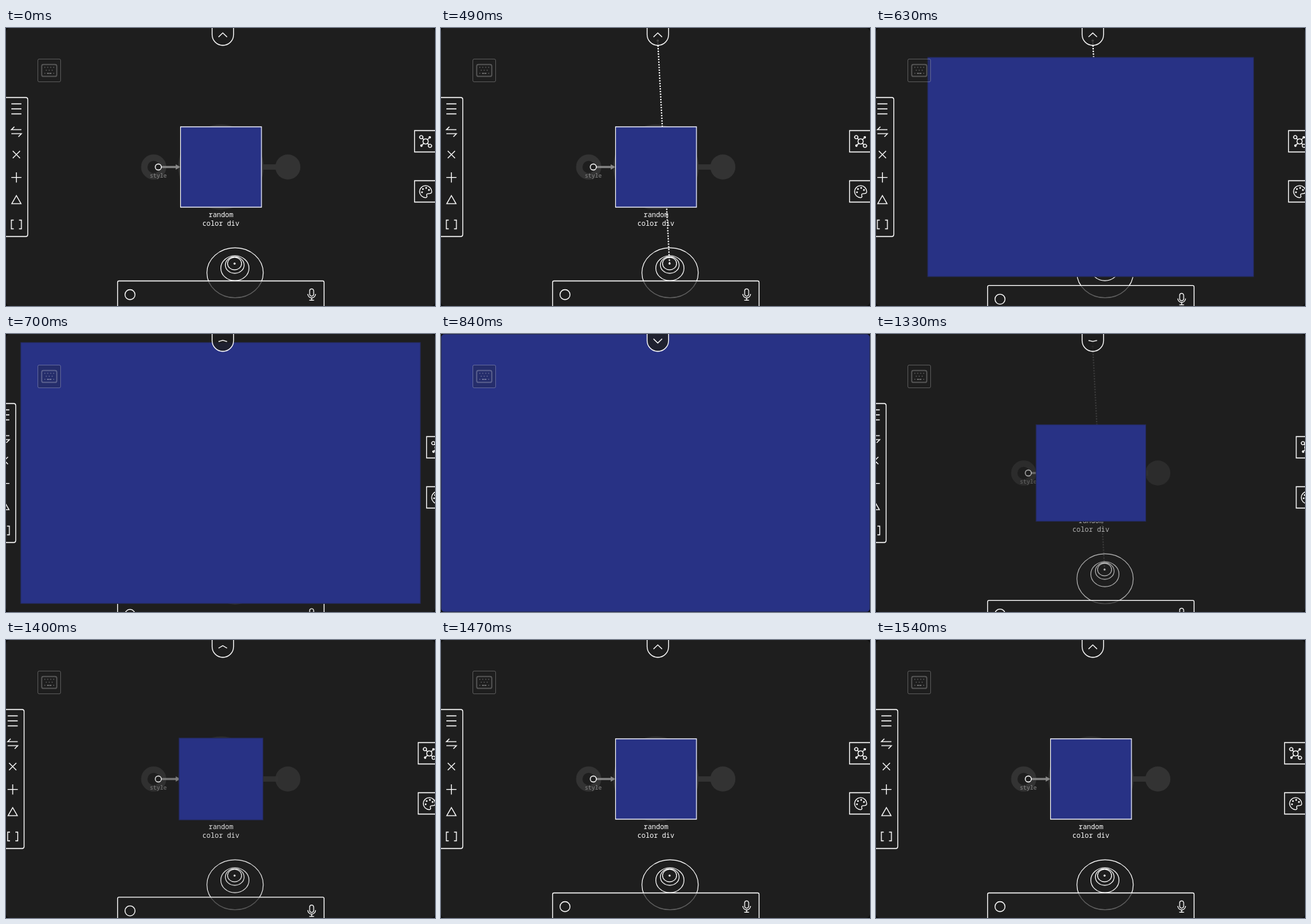
An HTML page with a canvas that plays this animation: 640x416 px, repeating every 1680 ms.

```html
<!DOCTYPE html>
<html lang="en">
<head>
<meta charset="utf-8">
<title>Node view</title>
<style>
  html, body { margin: 0; width: 100%; height: 100%; overflow: hidden; background: #0c0c0c; }
  canvas { display: block; width: 640px; height: 416px; }
</style>
</head>
<body>
<canvas id="stage" width="640" height="416"></canvas>
<script>
const ctx = document.getElementById('stage').getContext('2d');
const W = 640, H = 416, LOOP = 1680, TICK = 70, TURN = Math.PI * 2;
const BG = '#1e1e1e', BLUE = '#283285', NODE = '#333', WHITE = '#fff', GRAY = '#888';
const GLASS = 'rgba(30,30,30,.7)';
const MONO = '"Noto Sans Mono", "DejaVu Sans Mono", monospace';

const mix = (a, b, p) => a + (b - a) * p;
const unit = (t, start, span) => Math.min(1, Math.max(0, (t - start) / span));
const smooth = u => u * u * (3 - 2 * u);
const cubicOut = u => 1 - (1 - u) ** 3;
// Goes 0 to 1 from "open" and back to 0 from "close".
const swing = (t, open, close, span, ease) =>
  t < 1050 ? ease(unit(t, open, span)) : 1 - ease(unit(t, close, span));

function paint(fill, stroke, width = 1.3) {
  if (fill) { ctx.fillStyle = fill; ctx.fill(); }
  if (stroke) { ctx.strokeStyle = stroke; ctx.lineWidth = width; ctx.stroke(); }
}

function oval(x, y, rx, ry, fill, stroke, width) {
  ctx.beginPath();
  ctx.ellipse(x, y, rx, ry, 0, 0, TURN);
  paint(fill, stroke, width);
}

const disc = (x, y, r, fill, stroke, width) => oval(x, y, r, r, fill, stroke, width);
const dot = (x, y, r) => disc(x, y, r, WHITE);
const ring = (x, y, r) => disc(x, y, r, null, WHITE);

function box(x, y, w, h, r, fill, stroke, width) {
  ctx.beginPath();
  ctx.roundRect(x, y, w, h, r);
  paint(fill, stroke, width);
}

// Open polyline: x, y, x, y, ...
function line(...p) {
  ctx.beginPath();
  for (let i = 0; i < p.length; i += 2) ctx.lineTo(p[i], p[i + 1]);
  paint(null, WHITE);
}

// Regular polygon with its first corner at the angle "start".
function polygon(x, y, r, sides, start, fill, stroke) {
  ctx.beginPath();
  for (let i = 0; i < sides; i++) {
    const a = start + i * TURN / sides;
    ctx.lineTo(x + r * Math.cos(a), y + r * Math.sin(a));
  }
  ctx.closePath();
  paint(fill, stroke);
}

function label(text, x, y, size, color) {
  ctx.font = `${size}px ${MONO}`;
  ctx.textAlign = 'center';
  ctx.fillStyle = color;
  ctx.fillText(text, x, y);
}

function at(x, y, draw, alpha = 1) {
  ctx.save();
  ctx.translate(x, y);
  ctx.globalAlpha *= alpha;
  draw();
  ctx.restore();
}

// Draws something "count" times, turned evenly about the local centre.
function around(count, draw) {
  ctx.save();
  for (let i = 0; i < count; i++) {
    draw(i);
    ctx.rotate(TURN / count);
  }
  ctx.restore();
}

function graph() {
  disc(220.3, 208, 14, null, NODE, 9.5);
  disc(420.5, 208, 18.7, NODE);
  box(380, 204, 26, 8, 0, NODE);
  disc(320.7, 208, 63.5, NODE);

  box(231, 206.6, 23, 2.8, 0, GRAY);
  polygon(255.5, 208, 4.5, 3, 0, GRAY);
  disc(227.2, 208, 4.5, BG, WHITE);
  label('style', 227.2, 223.5, 8.5, GRAY);
  label('random', 320.7, 282.5, 10.2, WHITE);
  label('color div', 320.5, 295.5, 10.2, WHITE);
}

function rings() {
  for (let k = 1; k <= 4; k++) {
    const lift = 4 - k;
    oval(341 + lift / 4, 352.5 + 2.13 * lift ** 1.7, 42 / k, 37.4 / k, null, WHITE, 1.15);
  }
  dot(341, 352.5, 1.5);
}

function dottedLine() {
  ctx.beginPath();
  ctx.moveTo(323.3, 19);
  ctx.lineTo(341, 352.5);
  ctx.setLineDash([0.01, 4]);
  ctx.lineCap = 'round';
  paint(null, WHITE, 2.3);
  ctx.setLineDash([]);
  dot(323.3, 19, 1.8);
}

const plus = () => around(4, () => line(0, 0, 7.6, 0));

function menu() {
  for (const y of [-7.5, 0, 7.5]) line(-7.5, y, 7.5, y);
}

function cross() {
  ctx.rotate(TURN / 8);
  plus();
}

const swap = () => around(2, () => line(-3, -7.5, -7.5, -3, 7.5, -3));
const triangle = () => polygon(0, 1, 8, 3, -TURN / 4, null, WHITE);
const brackets = () => around(2, () => line(-4, -6.5, -7.5, -6.5, -7.5, 6.5, -4, 6.5));

function molecule() {
  ctx.rotate(-TURN * 3 / 8);
  ring(0, 0, 3.9);
  around(4, i => {
    line(3.9, 0, 7, 0);
    if (i % 2) dot(8.8, 0, 1.8);
    else ring(9.2, 0, 2.4);
  });
}

function palette() {
  ctx.beginPath();
  ctx.arc(0, 0, 9, TURN / 4, TURN * 1.02);
  ctx.bezierCurveTo(7, 5, 1, 1, 1.5, 5.5);
  ctx.quadraticCurveTo(3, 8.5, 0, 9);
  paint(null, WHITE);
  for (let i = 0; i < 4; i++) {
    const a = 2.95 + i * .96;
    dot(5.5 * Math.cos(a), 5.5 * Math.sin(a), 1.3);
  }
}

function mic() {
  box(-3, -8.7, 6, 11, 3, null, WHITE, 1.2);
  ctx.beginPath();
  ctx.arc(0, -1, 5.8, TURN / 2, 0, true);
  paint(null, WHITE, 1.2);
  line(0, 5, 0, 8.3);
  line(-3.5, 8.3, 3.5, 8.3);
}

function leftPanel() {
  box(-10, 104, 42.5, 208, 3, GLASS, WHITE);
  [menu, swap, cross, plus, triangle, brackets].forEach((icon, i) =>
    at(15.5, 121 + i * 34.2 + (i === 5 ? 2 : 0), icon));
}

function rightPanel() {
  [molecule, palette].forEach((icon, i) => {
    const y = 153.5 + 75 * i;
    box(609.5, y, 50, 32, 0, BG, WHITE);
    at(626, y + 16.3, icon);
  });
}

function bottomBar() {
  box(166.5, 378.5, 308, 60, 2, GLASS, WHITE);
  ring(185, 399, 7.5);
  at(456, 399, mic);
}

function keyboard() {
  box(47.5, 46.5, 34, 34, 2, BG, WHITE, 1);
  box(53.3, 54.6, 22.4, 17.8, 2.5, null, WHITE, 1.7);
  for (let row = 0; row < 3; row++) {
    const keys = 4 - row % 2;
    for (let i = 0; i < keys; i++)
      box(63.7 + (i - (keys - 1) / 2) * 4.4, 58 + row * 4.5, 1.6, 1.6, 0, WHITE);
  }
  box(61.4, 67, 6.2, 1.8, 0, WHITE);
}

function tab(dir) {
  ctx.beginPath();
  ctx.moveTo(307.5, -3);
  ctx.arc(323.5, 10, 16, TURN / 2, 0, true);
  ctx.lineTo(339.5, -3);
  paint('rgba(30,30,30,.82)', WHITE);
  at(323.4, 10.4, () => line(-6.4, 3.1 * dir, 0, -3.1 * dir, 6.4, 3.1 * dir));
}

function square(p, moving) {
  const x = mix(260, 0, p), y = mix(147.5, 0, p);
  const w = mix(381.5, W, p) - x, h = mix(268.5, H, p) - y;
  const edge = moving ? 'rgba(30,30,30,.45)' : WHITE;
  box(x, y, w, h, 0, BLUE);
  box(x + .4, y + .4, w - .8, h - .8, 0, null, edge, 1.1);
}

function draw(t) {
  const grow = swing(t, 528, 1158, 305, cubicOut);
  const slide = swing(t, 557, 1200, 270, smooth);
  const flip = swing(t, 610, 1235, 230, smooth);
  const closing = t >= 1260;
  const fade = closing ? mix(.42, 1, unit(t, 1260, 180)) : 1;
  const trail = closing ? mix(.42, 0, unit(t, 1260, 100)) : +(t >= 490);

  ctx.clearRect(0, 0, W, H);
  ctx.save();
  ctx.beginPath();
  ctx.roundRect(0, 0, W, H, 6);
  ctx.clip();
  ctx.fillStyle = BG;
  ctx.fillRect(0, 0, W, H);

  at(0, 0, graph, fade);
  at(0, 0, rings, fade);
  at(0, 0, dottedLine, trail);
  at(-33 * slide, 0, leftPanel);
  at(33 * slide, 0, rightPanel);
  at(0, 38 * slide, bottomBar);
  square(grow, t >= 630 && t < 1470);
  at(0, 0, keyboard, .25);
  tab(1 - 2 * flip);
  ctx.restore();
}

function run(now) {
  const t = now % LOOP;
  draw(t - t % TICK);
  requestAnimationFrame(run);
}
run(performance.now());
</script>
</body>
</html>
```
